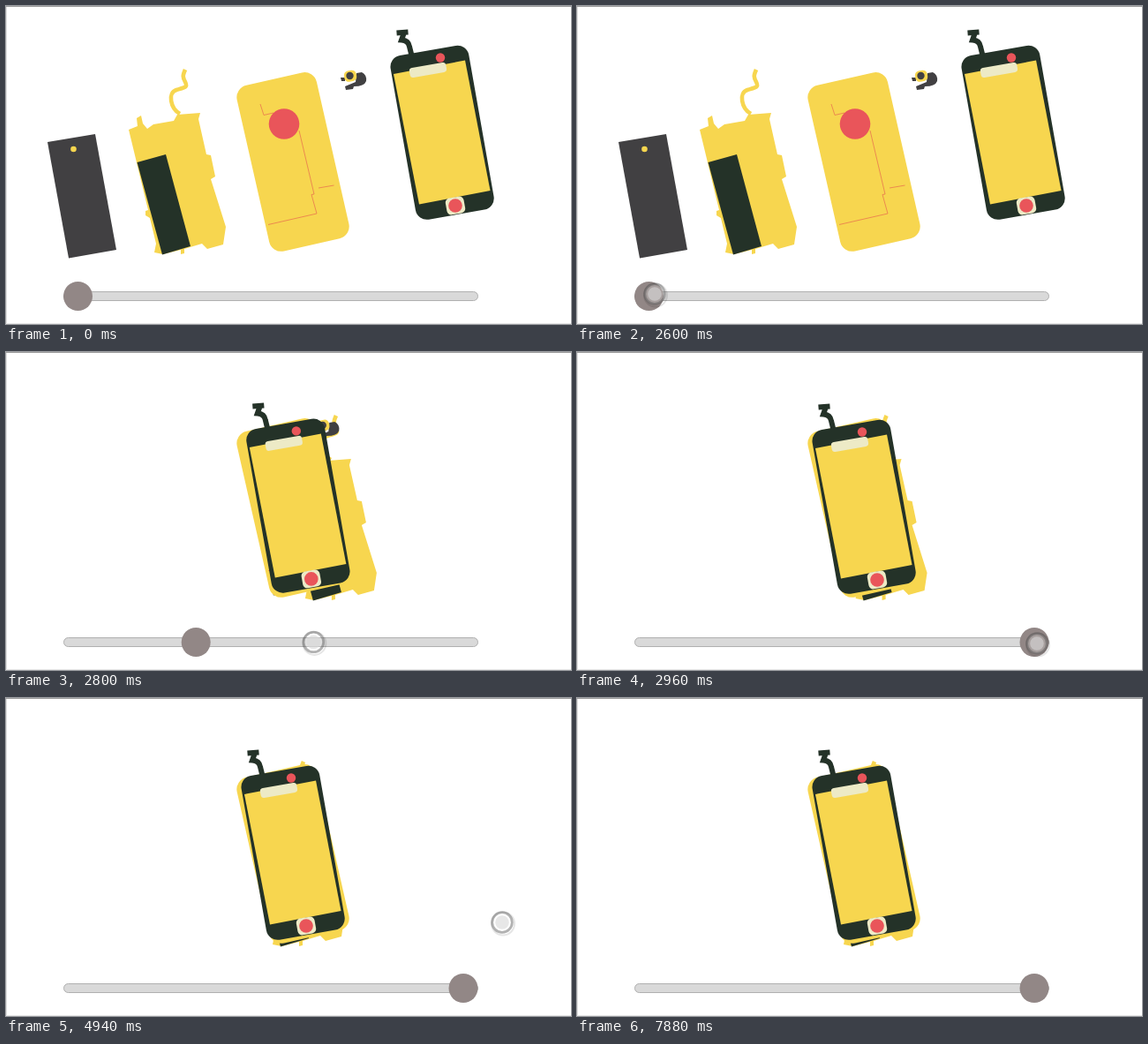
Animation of 640 by 360 pixels, one loop 8380 ms. Source, as an HTML page:

```html
<!DOCTYPE html>
<html lang="en">
<head>
<meta charset="utf-8">
<title>Phone assembly slider</title>
<style>
  html, body { margin: 0; width: 100%; height: 100%; overflow: hidden; background: #fff; }
  svg { display: block; width: 100%; height: 100%; }
  .yellow { fill: #f7d64f; }
  .dark { fill: #243228; }
  .grey { fill: #414042; }
  .red { fill: #e9555a; }
  .cream { fill: #edeac6; }
  .trace { fill: none; stroke: #e9774f; stroke-width: .8; }
  .cable { fill: none; stroke: #f7d64f; stroke-width: 4.6; }
  .dark-cable { fill: none; stroke: #243228; stroke-width: 6; }
</style>
</head>
<body>
<svg viewBox="0 0 640 360">
  <g id="battery">
    <path class="grey" d="M47 154 101 145 125 276 71 285.500Z"/>
    <circle class="yellow" cx="76.500" cy="162" r="3.300"/>
  </g>

  <g id="board">
    <path class="cable" d="M197 122C186 116 183 98 193 95S206 92 203 86 200 79 203 72"/>
    <path class="yellow" d="M139 140 149 136 148 127 153 124 155 133 160 139 167 134 190 130 194 123 220 121 218 128
      227 168 232 169 237 193 232 196 249 250 246 270 228 275 222 269 202 275 202 280 198 281 198 276
      178 281 168 279 170 269 163 240 158 237 158 232 161 231Z"/>
    <path class="dark" d="M148.500 177 181 168 209 272 177 281.500Z"/>
  </g>

  <g id="camera">
    <path class="grey" d="M397 76 403 75Q409 78 408 85 406 91 394 91L393 94 385 95 384 91 396 86ZM379 81H384V85H380Z"/>
    <rect class="yellow" x="383" y="73" width="14" height="12.500" rx="5" transform="rotate(-10 390 79)"/>
    <circle class="grey" cx="389.500" cy="79" r="4.200"/>
  </g>

  <g id="case">
    <rect class="yellow" x="278.800" y="80.200" width="92.500" height="192.500" rx="14" transform="rotate(-12.800 325 176.500)"/>
    <path class="trace" d="M288 111 292 123.500 303 121M332 141 349 213 346 213.500 352 235 297 247.500M354 206 371.500 203"/>
    <circle class="red" cx="315" cy="133.500" r="17.300"/>
  </g>

  <g id="display">
    <path class="dark-cable" d="M442.500 30.500 455.500 29.500M451 30 448 38.500Q456 39 457 46L460 58"/>
    <rect class="dark" x="449.100" y="49" width="90" height="188.500" rx="13" transform="rotate(-10 494.100 143.300)"/>
    <path class="yellow" d="M439 77 520 61.500 548.500 209 468 224.500Z"/>
    <rect class="cream" x="457" y="67" width="42" height="11" rx="3.500" transform="rotate(-10 478 72.500)"/>
    <circle class="red" cx="492" cy="58.500" r="5.200"/>
    <rect class="cream" x="498.500" y="216.500" width="21" height="19" rx="5" transform="rotate(-10 509 226)"/>
    <circle class="red" cx="509" cy="226" r="7.800"/>
  </g>

  <rect x="65.500" y="323.500" width="469" height="10" rx="5" fill="#d9d9d9" stroke="#b0b0b0"/>
  <circle id="thumb" cx="81.500" cy="328.500" r="16.500" fill="#928786"/>

  <g id="cursor">
    <circle cx="1" cy="1.500" r="13" fill="none" stroke="#000" stroke-opacity=".1" stroke-width="2"/>
    <circle r="11.300" fill="#fff" fill-opacity=".2" stroke="#555" stroke-opacity=".45" stroke-width="2.800"/>
    <circle r="7.800" fill="#d7d7d7" fill-opacity=".6"/>
  </g>

  <path d="M0 .5H640" stroke="#9a9a9a"/>
  <path d="M.5 1V360" stroke="#dcdcdc"/>
  <path d="M0 359.500H640" stroke="#e6e6e6"/>
</svg>
<script>
const LOOP = 8380, STEP = 20, DRAG = 2600;

const ramp = (t, from, to) => Math.min(1, Math.max(0, (t - from) / (to - from)));
const easeOut = x => 1 - (1 - x) ** 2;
const backIn = (x, pull) => x * x * ((pull + 1) * x - pull);
const decay = (t, tau) => Math.exp(-t / tau);

function place(id, x, y) {
  document.getElementById(id).setAttribute('transform', `translate(${x} ${y})`);
}

// Share of each part's way after t ms of dragging.
const travel = {
  battery: t => 1 - decay(t, 71.5),
  board: t => 1 + .961 * decay(t, 160) - 1.961 * decay(t, 15),
  camera: t => 1 - decay(t * t, 263 ** 2),
  display: t => .51 * backIn(ramp(t, 0, 100), 6.3) + .49 * easeOut(ramp(t, 100, 236))
};
const offset = { battery: [247, -10.7], board: [134, 0], camera: [-70, 9], display: [-169, 32] };

function draw(t) {
  const drag = Math.max(0, t - DRAG);
  for (const id in travel) {
    const share = travel[id](drag);
    place(id, offset[id][0] * share, offset[id][1] * share);
  }
  place('thumb', Math.min(436.5, 29.5 * (drag / 100) ** 2.18), 0);

  const enter = easeOut(ramp(t, 1700, 2040));
  const pull = drag && 1 / (1 + decay(drag - 188.5, 28.4));
  const back = easeOut(ramp(t, 2980, 3420));
  const leave = ramp(t, 4740, 4940);
  const exit = ramp(t, 6060, 6160);
  place('cursor',
    80 + 8 * enter + 434 * pull - 34 * back + 74 * leave + 98 * exit,
    376 - 50 * enter + 4 * pull - 76 * leave - 86 * exit);
}

const start = performance.now();
function tick() {
  const t = (performance.now() - start) % LOOP;
  draw(Math.floor(t / STEP) * STEP);
  requestAnimationFrame(tick);
}
tick();
</script>
</body>
</html>
```
